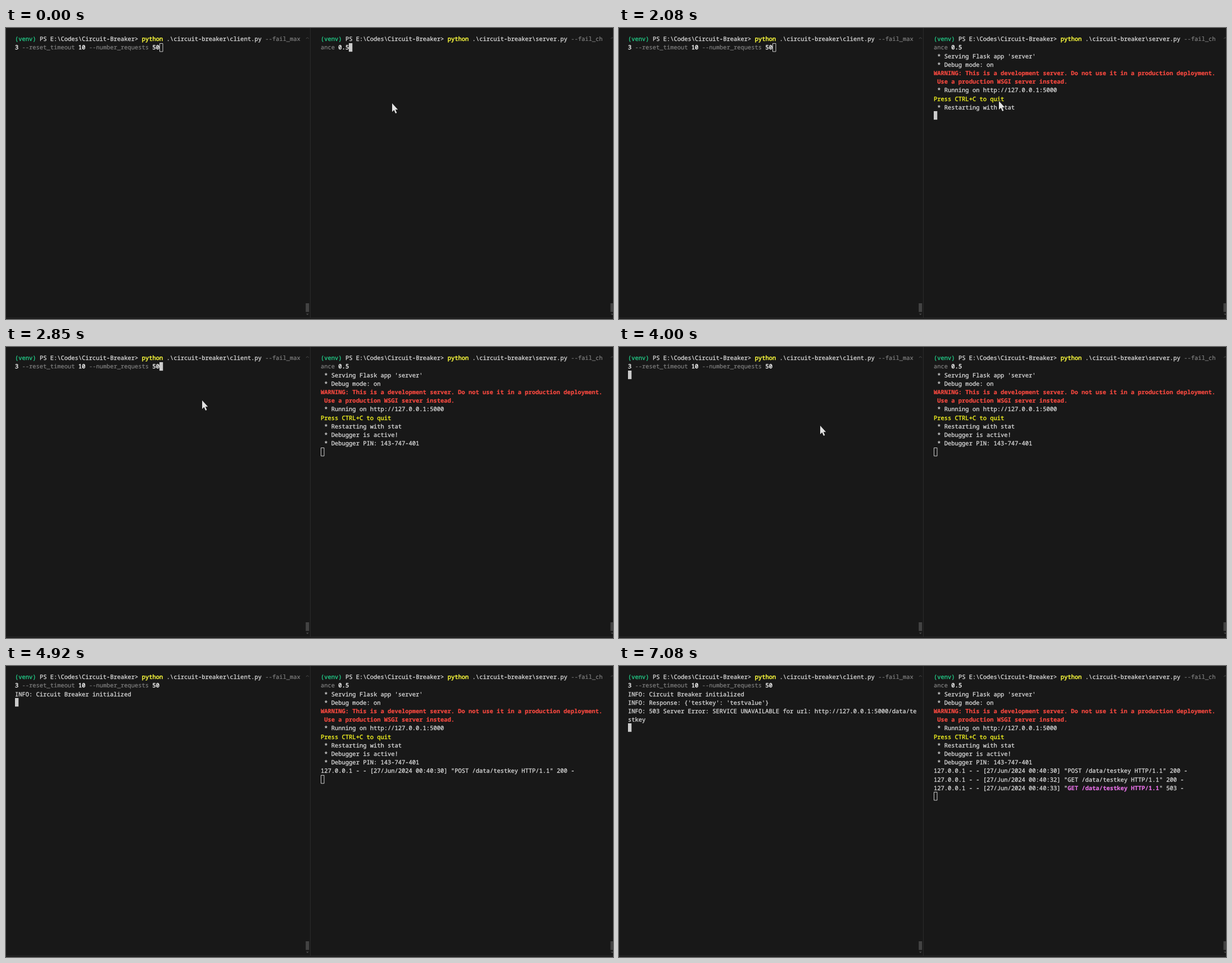
An HTML page with a canvas that plays this animation: 1080x518 px, repeating every 8000 ms.

```html
<!DOCTYPE html>
<html lang="en">
<head>
<meta charset="utf-8">
<title>Circuit breaker terminals</title>
<style>
  html, body { margin: 0; height: 100%; overflow: hidden; background: #181818; }
  canvas { display: block; width: 100vw; height: 100vh; }
</style>
</head>
<body>
<canvas width="1080" height="518"></canvas>
<script>
const ctx = document.querySelector('canvas').getContext('2d');
const LOOP = 8000, TICKS_PER_MS = 0.013;
const CELL_W = 6.27, CELL_H = 15.2, TOP = 11.8, BASELINE = 11.4;
const FONT = '10.45px "Noto Sans Mono", monospace';

// The outline gives the small glyphs their stem weight.
const style = (color, outline = 0.3, weight = 400) => text => ({ color, outline, weight, text });
const plain = style('#dadada');
const green = style('#23d18b');
const command = style('#f8f83c', 0.5);
const notice = style('#f0f020', 0.4);
const option = style('#808080', 0.2);
const number = style('#f0f0f0', 0.5);
const alert = style('#f5483f', 0.2, 700);
const failure = style('#e06ee0', 0.2, 700);

const line = (at, ...spans) => ({ at, spans });
const promptLine = (script, flag) => line(0, green('(venv)'), plain(' PS E:\\Codes\\Circuit-Breaker> '),
  command('python'), plain(` .\\circuit-breaker\\${script}.py `), option(flag));
const logLine = (at, second, request, code, look = plain) => line(at,
  plain(`127.0.0.1 - - [27/Jun/2024 00:40:${second}] "`), look(request), plain(`" ${code} -`));

// All times below are in ticks of 1/13 second.
const FOCUS_SWAP = 37;
const client = {
  x: 16, entered: 47, inputColumn: 41,
  lines: [
    promptLine('client', '--fail_max'),
    line(0, number('3'), option(' --reset_timeout '), number('10'),
      option(' --number_requests '), number('50')),
    line(53, plain('INFO: Circuit Breaker initialized')),
    line(79, plain("INFO: Response: {'testkey': 'testvalue'}")),
    line(92, plain('INFO: 503 Server Error: SERVICE UNAVAILABLE for url: http://127.0.0.1:5000/data/te')),
    line(92, plain('stkey'))
  ]
};
const server = {
  x: 560, entered: 24, inputColumn: 8,
  lines: [
    promptLine('server', '--fail_ch'),
    line(0, option('ance '), number('0.5')),
    line(26, plain(" * Serving Flask app 'server'")),
    line(26, plain(' * Debug mode: on')),
    line(27, alert('WARNING: This is a development server. Do not use it in a production deployment.')),
    line(27, alert(' Use a production WSGI server instead.')),
    line(27, plain(' * Running on http://127.0.0.1:5000')),
    line(27, notice('Press CTRL+C to quit')),
    line(27, plain(' * Restarting with stat')),
    line(33, plain(' * Debugger is active!')),
    line(33, plain(' * Debugger PIN: 143-747-401')),
    logLine(54, 30, 'POST /data/testkey HTTP/1.1', 200),
    logLine(79, 32, 'GET /data/testkey HTTP/1.1', 200),
    logLine(92, 33, 'GET /data/testkey HTTP/1.1', 503, failure)
  ]
};

// Pointer stops: tick, x, y.
const pointerPath = [
  [1, 687, 134], [3, 687, 130], [25, 687, 130], [27, 676, 130], [36, 349, 95],
  [48, 349, 95], [52, 358, 140], [55, 340, 268], [56, 340, 268], [58, 340, 267],
  [61, 340, 267], [63, 96, 182]
];
const POINTER_GONE = 64;
const arrow = new Path2D('M0 0V15.2L3.4 12L6 18L8.4 17L5.8 11.2H10.2Z');

function pointerAt(tick) {
  const next = pointerPath.findIndex(stop => stop[0] >= tick);
  if (next < 1) return pointerPath[0].slice(1);
  const [t0, x0, y0] = pointerPath[next - 1], [t1, x1, y1] = pointerPath[next];
  const p = (tick - t0) / (t1 - t0), eased = p * p * (3 - 2 * p);
  return [x0 + (x1 - x0) * eased, y0 + (y1 - y0) * eased];
}

function drawPane({ x, entered, inputColumn, lines }, tick, focused) {
  const shown = lines.filter(({ at }) => at <= tick);
  shown.forEach(({ spans }, row) => {
    let column = 0;
    for (const { color, outline, weight, text } of spans) {
      const place = [text, x + column * CELL_W, TOP + row * CELL_H + BASELINE];
      ctx.font = `${weight} ${FONT}`;
      ctx.fillStyle = ctx.strokeStyle = color;
      ctx.lineWidth = outline;
      ctx.fillText(...place);
      ctx.strokeText(...place);
      column += text.length;
    }
  });

  const typing = tick < entered;
  const left = Math.round(x + (typing ? inputColumn * CELL_W : 0));
  const top = Math.floor(TOP + (typing ? 1 : shown.length) * CELL_H);
  ctx.fillStyle = ctx.strokeStyle = '#cccccc';
  ctx.lineWidth = 1;
  if (focused) ctx.fillRect(left, top, 6.3, 15.2);
  else ctx.strokeRect(left + 0.5, top + 0.5, 5.5, 14.5);
}

function drawScrollbar(x) {
  ctx.fillStyle = '#434343';
  ctx.fillRect(x - 3, 490, 6, 15.5);
  ctx.fillStyle = ctx.strokeStyle = '#4c4c4c';
  ctx.lineWidth = 1;
  ctx.fill(new Path2D(`M${x - 2.5} 508.5h5l-2.5 2.5z`));
  ctx.stroke(new Path2D(`M${x - 2.5} 19l2.5 -2l2.5 2`));
}

function draw(tick) {
  ctx.fillStyle = '#181818';
  ctx.fillRect(0, 0, 1080, 518);
  ctx.fillStyle = '#2b2b2b';
  ctx.fillRect(541, 0, 1, 516);
  ctx.fillRect(0, 515.5, 1080, 1);
  drawScrollbar(536.3);
  drawScrollbar(1078.5);

  drawPane(client, tick, tick >= FOCUS_SWAP);
  drawPane(server, tick, tick < FOCUS_SWAP);

  if (tick < POINTER_GONE) {
    ctx.save();
    ctx.translate(...pointerAt(tick));
    ctx.strokeStyle = '#181818';
    ctx.lineWidth = 2;
    ctx.stroke(arrow);
    ctx.fillStyle = '#e2e2e2';
    ctx.fill(arrow);
    ctx.restore();
  }
}

ctx.textRendering = 'geometricPrecision';
ctx.lineJoin = 'round';
function play() {
  // The small offset absorbs rounding at tick boundaries.
  draw(Math.floor((performance.now() % LOOP) * TICKS_PER_MS + 0.06));
  requestAnimationFrame(play);
}
play();
</script>
</body>
</html>
```
